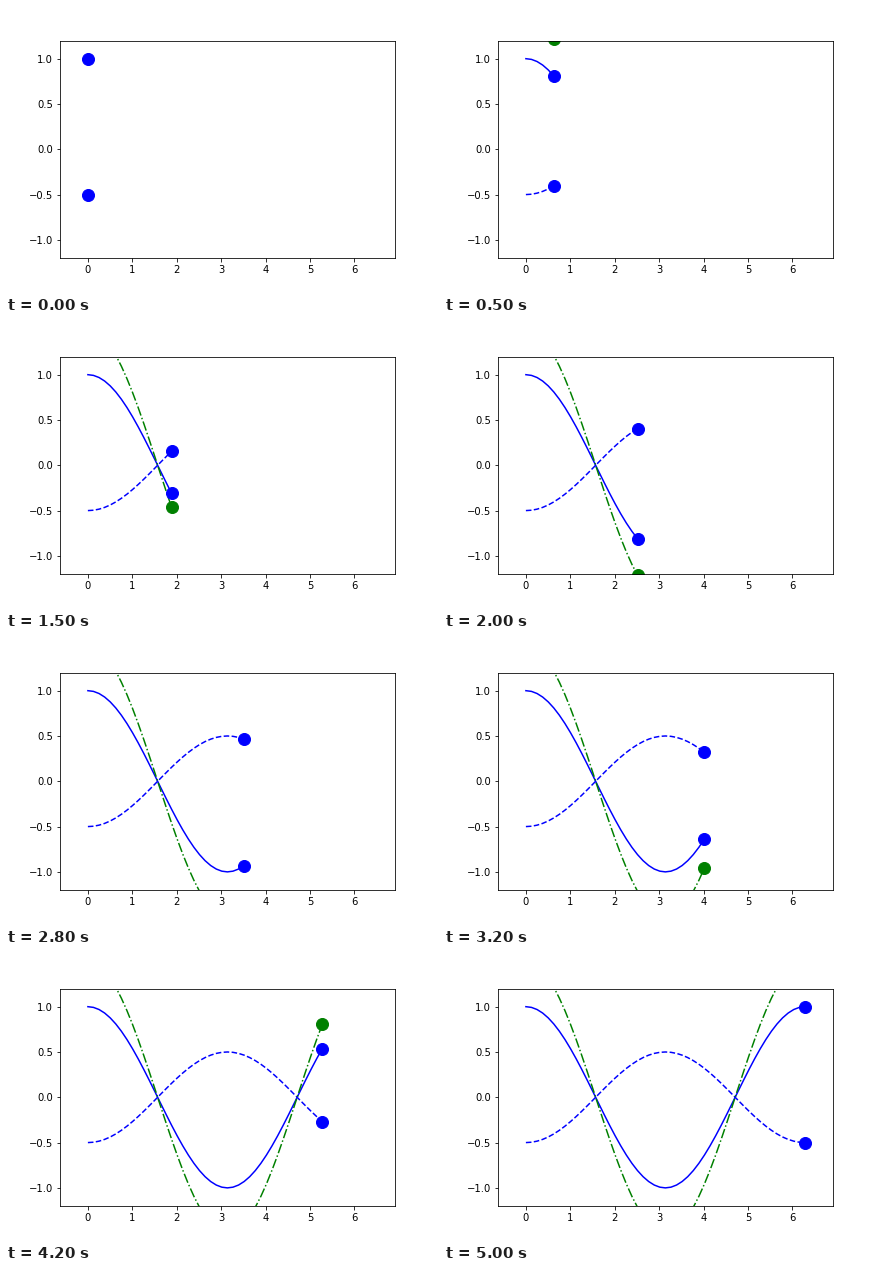
A matplotlib script for the animation above (5.1 s loop, 432 by 288 pixels).

```python
import numpy as np
import matplotlib.pyplot as plt
from matplotlib.animation import FuncAnimation

STEPS = 50
CURVES = [(1.0, "b", "-"), (-0.5, "b", "--"), (1.5, "g", "-.")]

t = np.linspace(0, 2 * np.pi, STEPS + 1)

fig = plt.figure(figsize=(6, 4), dpi=72, facecolor="white")
fig.subplots_adjust(left=0.125, right=0.9, bottom=0.125, top=0.88)
ax = fig.add_subplot()
ax.set_xlim(-0.1 * t[-1], 1.1 * t[-1])
ax.set_ylim(-1.2, 1.2)
ax.set_xticks(range(7))
ax.set_yticks(np.arange(-1, 1.1, 0.5))

# Each curve has a growing trail and a dot at its tip.
trails = [ax.plot([], [], color=c, ls=ls, lw=1.5)[0] for _, c, ls in CURVES]
dots = [ax.plot([], [], "o", color=c, ms=12)[0] for _, c, _ in CURVES]


def update(i):
    for (amp, _, _), trail, dot in zip(CURVES, trails, dots):
        x = t[:i + 1]
        y = amp * np.cos(x)
        trail.set_data(x, y)
        dot.set_data(x[-1:], y[-1:])
    return trails + dots


anim = FuncAnimation(fig, update, frames=STEPS + 1, interval=100,
                     repeat=True, repeat_delay=0)
plt.show()
```
